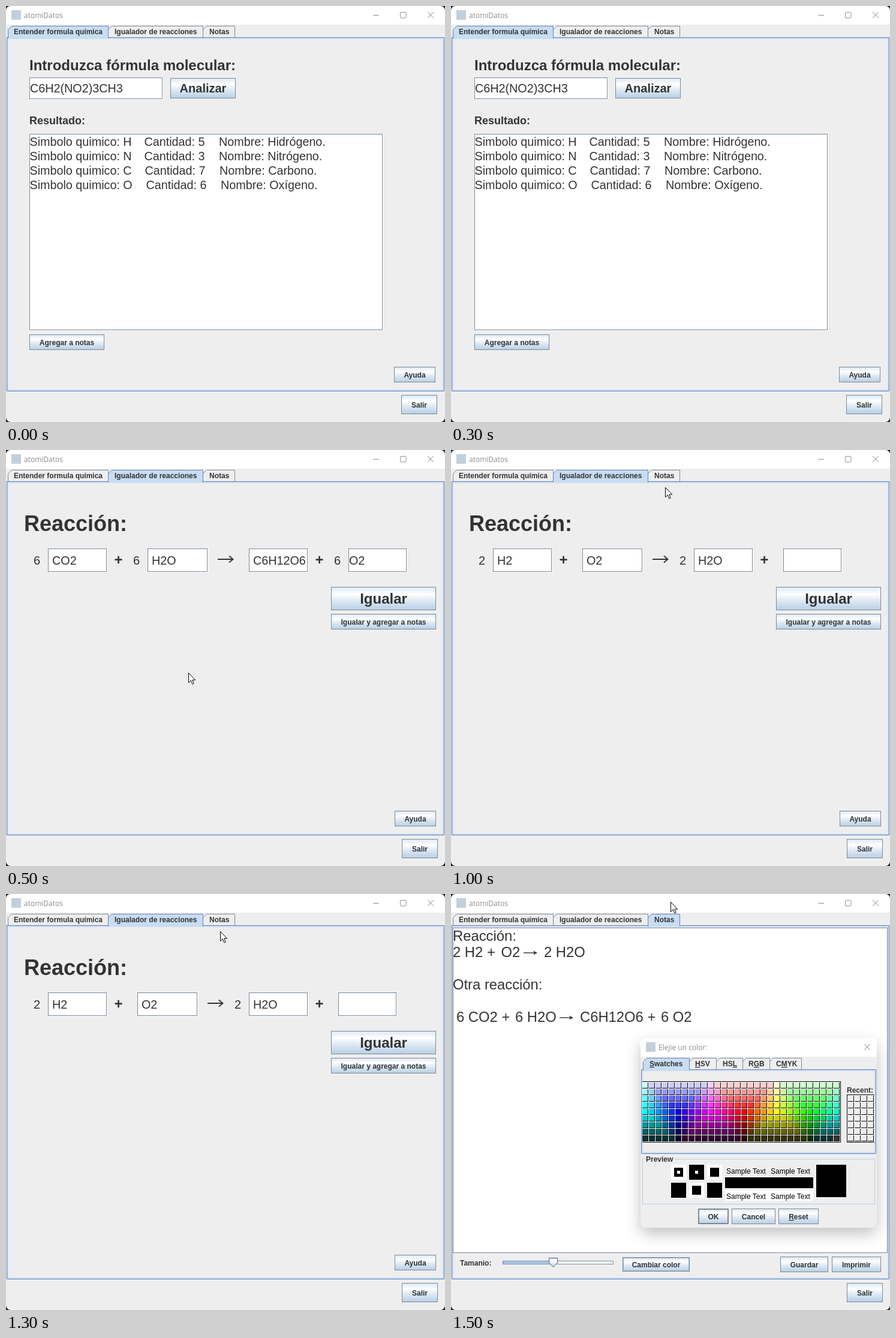
Write an HTML page that moves like this. It is 732 px wide and 693 px high and loops after 2000 ms.

```html
<!DOCTYPE html>
<html lang="es">
<head>
<meta charset="utf-8">
<title>atomiDatos</title>
<style>
html, body { margin: 0; width: 100%; height: 100%; overflow: hidden; background: #1d2127; }
svg { display: block; width: 732px; height: 693px; }
text { font-family: "Liberation Sans", Arial, sans-serif; fill: #333; white-space: pre; }
.b { font-weight: bold; }
.ui { font-family: "Open Sans", sans-serif; fill: #8c8c8c; }
</style>
</head>
<body>
<svg id="stage" viewBox="0 0 732 693" xmlns="http://www.w3.org/2000/svg">
<defs>
<linearGradient id="ocean" x1="0" y1="0" x2="0" y2="1">
<stop offset="0" stop-color="#dde8f3"/><stop offset=".3" stop-color="#fff"/>
<stop offset=".6" stop-color="#dde8f3"/><stop offset="1" stop-color="#b8cfe5"/>
</linearGradient>
<filter id="blur" x="-30%" y="-30%" width="160%" height="160%"><feGaussianBlur stdDeviation="13"/></filter>
<clipPath id="recent"><rect x="660" y="334" width="46" height="80"/></clipPath>
</defs>
</svg>
<script>
const STEP = 500;
const GREY = '#7a8a99', BLUE = '#6382bf', PALE = '#c8ddf2', FACE = '#eee';
const stage = document.getElementById('stage');

const rect = (x, y, w, h, fill, extra = '') =>
  `<rect x="${x}" y="${y}" width="${w}" height="${h}" fill="${fill}" ${extra}/>`;
// Filled box with a crisp one-pixel border inside its bounds
const box = (x, y, w, h, fill, line = GREY) =>
  rect(x + .5, y + .5, w - 1, h - 1, fill, `stroke="${line}"`);
const path = (d, stroke, width = 1, fill = 'none') =>
  `<path d="${d}" fill="${fill}" stroke="${stroke}" stroke-width="${width}"/>`;
const mark = s => s.replace(/_(.)/, '<tspan text-decoration="underline">$1</tspan>');
const text = (x, y, s, size = 12, cls = '', extra = '') =>
  `<text x="${x}" y="${y}" font-size="${size}" class="${cls}" ${extra}>${mark(s)}</text>`;
const bold = (x, y, s, size = 12, extra = '') => text(x, y, s, size, 'b', extra);

function button(x, y, w, h, label, size = 12, ring = '') {
  const inner = ring ? rect(x + 1.5, y + 1.5, w - 3, h - 3, 'none', `stroke="${ring}"`) : '';
  const base = y + Math.round(h / 2 + size * .36 + (size < 20 ? .5 : 0));
  return box(x, y, w, h, 'url(#ocean)') + inner +
    bold(x + w / 2, base, label, size, 'text-anchor="middle"');
}

const field = (x, y, w, h) =>
  rect(x + 1, y + 1, w, h, '#fff') + box(x, y, w, h, '#fff');

// edges: tab borders from left to right; items: [text x, label]
function tabs(edges, top, items, sel) {
  const base = top + 19;
  const shape = (i, bottom) => {
    const a = edges[i] + .5, b = edges[i + 1] + .5;
    return `M${a} ${bottom}V${top + 6.5}L${a + 6} ${top + .5}H${b}V${bottom}`;
  };
  let out = '';
  items.forEach((it, i) => {
    if (i !== sel) out += path(shape(i, base), GREY, 1, FACE);
  });
  out += path(`M${edges[0] - 2} ${base + .5}H${edges[edges.length - 1] > 500 ? 709 : 731}`, BLUE);
  out += path(shape(sel, base + 2), BLUE, 1, PALE);
  items.forEach(([x, s]) => out += bold(x, top + 14, s));
  return out;
}

function panel(x, y, r, b) {
  return rect(x + 1, y + 1, r - x - 1, b - y - 1, 'none') +
    path(`M${x + 2} ${y + 2}H${r - 1}V${b - 1}H${x + 2}Z`, PALE, 2) +
    path(`M${x + .5} ${y + .5}V${b + .5}H${r + .5}V${y + .5}`, BLUE);
}

const cross = (x, y) => path(`M${x} ${y}l10 10m0 -10l-10 10`, '#8f8f8f');
const icon = (x, y) => rect(x, y, 16, 16, '#c3d0dc');
const arrow = (x, y) => path(`M${x} ${y}h25m-6 -5.5l6.5 5.5l-6.5 5.5`, '#333', 1.9);
const noteArrow = (x, y) =>
  path(`M${x} ${y}h19`, '#333', 1.4) + `<path d="M${x + 16} ${y - 3.5}l7 3.5l-7 3.5l2 -3.5z" fill="#333"/>`;
const cursor = (x, y) =>
  path(`M${x + .5} ${y + .5}v16l3.7 -3.6l2.6 6l2.4 -1l-2.5 -5.8h5z`, '#000', 1, '#fff');

function frame(sel, dx = 1) {
  return rect(0, 0, 732, 693, FACE, 'rx="8"') +
    `<path d="M0 31V8a8 8 0 0 1 8 -8H724a8 8 0 0 1 8 8V31Z" fill="#fff"/>` +
    icon(9, 7) + text(30, 20, 'atomiDatos', 12, 'ui') +
    path('M612 15.5h10M659 10.5h6.5q1.500 0 1.500 1.500v6.500q0 1.500 -1.500 1.500h-6.500q-1.500 0 -1.500 -1.500v-6.500q0 -1.500 1.500 -1.500z', '#8f8f8f') +
    cross(703, 10) + panel(1, 52, 730, 641) +
    tabs([3, 170, 328, 381], 33, [[13, 'Entender formula química'], [181, 'Igualador de reacciones'], [339, 'Notas']], sel) +
    button(659 + dx, 648, 60, 32, 'Salir');
}

function formulaView() {
  const rows = [['H', 5, 'Hidrógeno', 0], ['N', 3, 'Nitrógeno', 0], ['C', 7, 'Carbono', 1], ['O', 6, 'Oxígeno', 3]];
  const size = 19.75;
  let out = frame(0, 0) + bold(39, 107, 'Introduzca fórmula molecular:', 24) +
    field(39, 119, 222, 36) + text(40, 144, 'C6H2(NO2)3CH3', size) +
    button(274, 120, 109, 34, 'Analizar', 20) +
    bold(39, 197, 'Resultado:', 18) + field(39, 213, 589, 327);
  rows.forEach(([sym, n, name, dx], i) => {
    const y = 233 + 24 * i;
    out += text(39.500, y, 'Simbolo quimico: ' + sym, size) +
      text(230.500 + dx, y, 'Cantidad: ' + n, size) +
      text(355 + dx, y, `Nombre: ${name}.`, size);
  });
  return out + button(39, 547, 125, 26, 'Agregar a notas') + button(647, 601, 69, 26, 'Ayuda');
}

// boxes: [x, width, text x, text]; counts: [x, digit]
function reactionView(boxes, counts, arrowX, pointer) {
  return frame(1) + bold(30, 135, 'Reacción:', 36) +
    boxes.map(([x, w, tx, s]) => field(x, 164, w, 39) + text(tx - 1, 191, s, 19.75)).join('') +
    counts.map(([x, n]) => text(x - 1, 191, n, 20)).join('') +
    bold(180.500, 191, '+', 24) + bold(515.500, 191, '+', 24) + arrow(arrowX, 182) +
    button(542, 228, 175, 39, 'Igualar', 24) +
    button(542, 273, 175, 26, 'Igualar y agregar a notas') +
    button(648, 601, 69, 26, 'Ayuda') + cursor(...pointer);
}

// Colour wheel of 30 steps; each channel is full for a third and falls off by 51
function swatch(k, row) {
  if (k === 29 && row === 8) return '#333';
  const min = Math.max(0, 204 - 51 * row), max = Math.min(255, 255 - 51 * (row - 4));
  const level = mid => {
    const d = Math.max(0, Math.abs((k - mid + 45) % 30 - 15) - 5);
    return Math.min(max, Math.max(min, 255 - 51 * d));
  };
  return `rgb(${level(15)},${level(25)},${level(5)})`;
}

function grid(x, y, cols, rows, color) {
  let out = '';
  for (let r = 0; r < rows; r++) for (let c = 0; c < cols; c++) {
    const px = x + 11 * c, py = y + 11 * r;
    out += rect(px, py, 10, 10, '#000') + rect(px, py, 9, 9, color(c, r));
  }
  return out;
}

function preview() {
  const sq = (x, y, ...fills) => fills.map((f, i) =>
    f ? rect(x + 5 * i, y + 5 * i, 25 - 10 * i, 25 - 10 * i, f) : '').join('');
  const K = '#000', W = '#fff';
  const sample = y => text(459, y, 'Sample Text', 12, '', 'style="fill:#000"') +
    text(533, y, 'Sample Text', 12, '', 'style="fill:#000"');
  return box(319, 441, 388, 76, 'none', '#b8cfe5') + rect(323, 437, 50, 10, FACE) +
    bold(325, 446, 'Preview') +
    sq(367, 451, W, K, W) + sq(397, 451, K, '', W) + sq(427, 451, W, K) +
    sq(367, 481, K) + sq(397, 481, W, K) + sq(427, 481, K) +
    rect(457, 472, 147, 18, K) + rect(457, 494, 147, 17, W) +
    sample(466) + sample(508) + rect(609, 451, 50, 54, K);
}

function dialog() {
  return rect(316, 250, 394, 316, '#000', 'rx="8" opacity=".24" filter="url(#blur)"') +
    rect(316, 240, 394, 316, FACE, 'rx="8"') +
    '<path d="M316 271V248a8 8 0 0 1 8 -8H702a8 8 0 0 1 8 8V271Z" fill="#fff"/>' +
    icon(325, 247) + text(346, 260, 'Elejie un color:', 12, 'ui') + cross(689, 250) +
    panel(317, 292, 708, 432) +
    tabs([320, 397, 442, 486, 531, 584], 273,
      [[331, '_Swatches'], [407, '_HSV'], [453, 'HS_L'], [496, 'R_GB'], [542, 'C_MYK']], 0) +
    rect(319, 312, 331, 102, '#000') + rect(319, 313, 330, 100, '#fff') +
    grid(319, 314, 30, 9, swatch) +
    bold(660, 331, 'Recent:') + '<g clip-path="url(#recent)">' +
    rect(660, 334, 58, 80, '#000') + rect(661, 335, 56, 78, '#fff') +
    grid(662, 336, 5, 7, () => FACE) + '</g>' + preview() +
    button(412, 524, 51, 26, 'OK', 12, GREY) + button(468, 524, 73, 26, 'Cancel') +
    button(546, 524, 67, 26, '_Reset');
}

function notesView() {
  const note = (x, y, s) => text(x, y, s, 23.8);
  return frame(2) + box(3, 56, 725, 542, '#fff') +
    note(3, 78, 'Reacción:') +
    note(3, 105, '2 H2 +') + note(83.500, 105, 'O2') + noteArrow(121, 98) + note(155, 105, '2 H2O') +
    note(3, 159, 'Otra reacción:') +
    note(9, 213, '6 CO2 +') + note(107, 213, '6 H2O') + noteArrow(181, 206) +
    note(215, 213, 'C6H12O6 +') + note(350, 213, '6 O2') +
    bold(15, 619, 'Tamanio:') +
    box(86, 611, 185, 6, '#fff', GREY) + rect(87, 612, 83, 4, PALE) +
    rect(86.500, 611.500, 84, 5, 'none', `stroke="${BLUE}"`) + rect(87, 613, 83, 2, '#a3b8cc') +
    path('M163.500 606.500h14v8l-7 7l-7 -7z', '#4d5c6b', 1, 'url(#ocean)') +
    button(286, 605, 112, 24, 'Cambiar color', 12, '#a3b8cc') +
    button(549, 604, 80, 26, 'Guardar') + button(635, 604, 82, 26, 'Imprimir') +
    dialog() + cursor(366, 13);
}

const views = [
  formulaView(),
  reactionView(
    [[70, 98, 78, 'CO2'], [236, 100, 244, 'H2O'], [405, 98, 413, 'C6H12O6'], [571, 97, 573, 'O2']],
    [[47, 6], [213, 6], [548, 6]].map(([x, n]) => [x, String(n)]), 353, [304, 371]),
  reactionView(
    [[70, 98, 78, 'H2'], [219, 100, 227, 'O2'], [405, 98, 413, 'H2O'], [554, 97, 556, '']],
    [[47, '2'], [382, '2']], 336, [357, 62]),
  notesView()
];
stage.insertAdjacentHTML('beforeend', rect(0, 0, 732, 693, '#1d2127') +
  views.map(v => `<g class="view" display="none">${v}</g>`).join(''));
const groups = [...stage.querySelectorAll('.view')];

function draw(t) {
  const now = Math.floor(t / STEP) % groups.length;
  groups.forEach((g, i) => g.setAttribute('display', i === now ? 'inline' : 'none'));
}

const start = performance.now();
function tick() {
  draw(performance.now() - start);
  requestAnimationFrame(tick);
}
draw(0);
requestAnimationFrame(tick);
</script>
</body>
</html>
```
